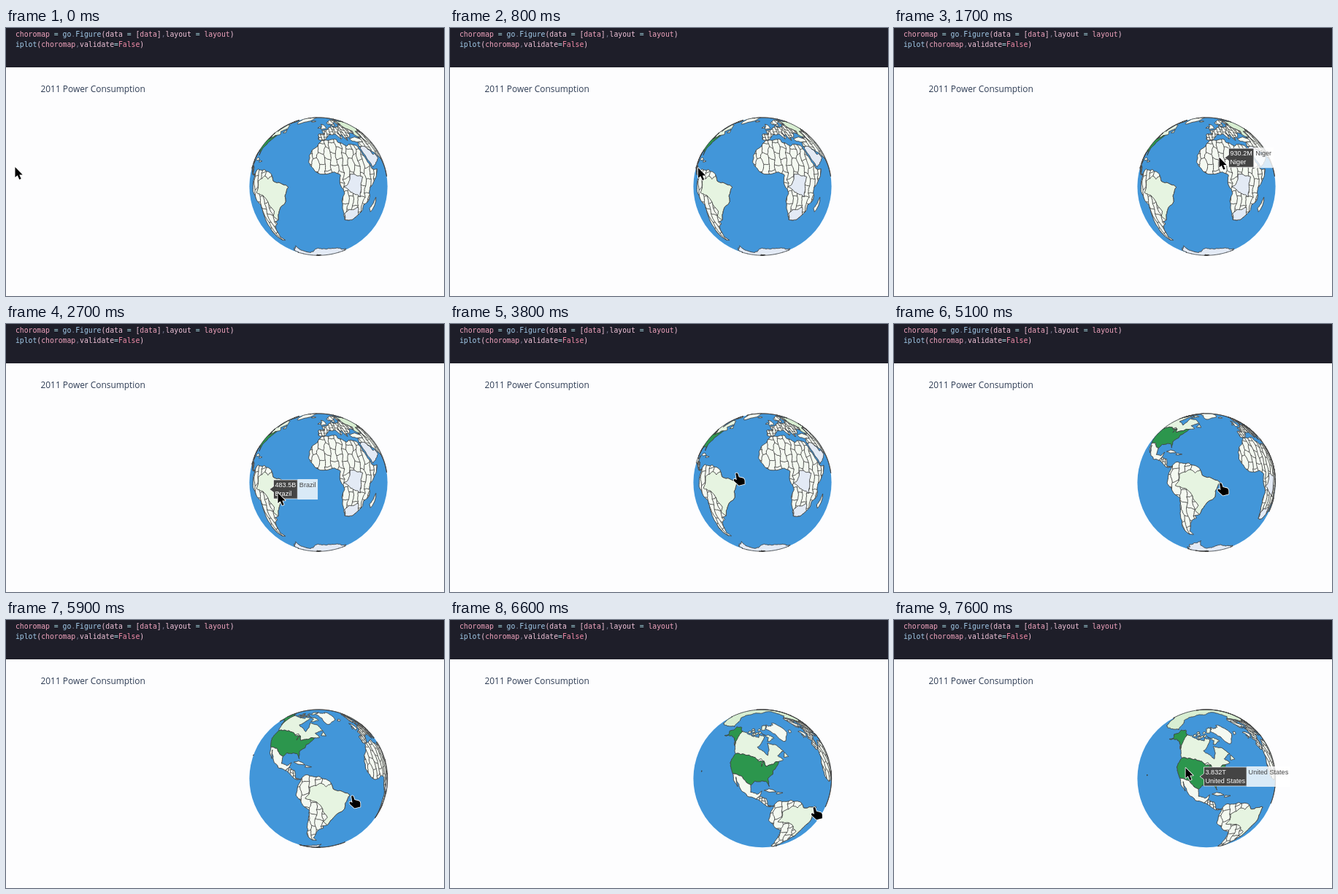
Recreate the animation shown at these times as an HTML page with a canvas. Size 600 by 368 pixels, loop 8000 ms.

```html
<!DOCTYPE html>
<html lang="en">
<head>
<meta charset="utf-8">
<title>Power consumption globe</title>
<style>
html, body { margin: 0; width: 100%; height: 100%; overflow: hidden; background: #fdfdfe; }
canvas, pre, h1 { position: absolute; left: 0; top: 0; margin: 0; font-weight: 400; }
pre { box-sizing: border-box; width: 600px; height: 54px; padding: 2.3px 0 0 13px; background: #1e1e29;
  color: #f0a3bd; font: 9.75px/13.2px "DejaVu Sans Mono", monospace; }
h1 { left: 47.5px; top: 74.6px; color: #2f3d55; font: 11.9px/16px "Open Sans", sans-serif; white-space: nowrap; }
i { font-style: normal; color: #a6d8e0; }
b { font-weight: 400; color: #a3cbea; }
u { text-decoration: none; color: #6c6f85; }
em { font-style: normal; color: #efc3d8; }
s { text-decoration: none; color: #f38ba8; }
</style>
</head>
<body>
<pre>choromap <i>=</i> <b>go</b><u>.</u><b>Figure</b><em>(data <i>=</i> [</em>data<em>]</em><u>,</u><em>layout</em> <i>=</i> layout<em>)</em>
<b>iplot</b><em>(</em>choromap<u>,</u><em>validate</em><i>=</i><s>False</s><em>)</em></pre>
<h1>2011 Power Consumption</h1>
<canvas width="600" height="368"></canvas>
<script>
const ctx = document.querySelector('canvas').getContext('2d');
const CX = 428, CY = 217.6, R = 94.6, RAD = Math.PI / 180;
const PALE = '#f4f9f1', LIGHT = '#e6f4e1', GREEN = '#2c964d', NONE = '#e3eaf5', MILD = '#d8eed2';
const lands = [];

// Seeded value from 0 to 1 that depends on a place
const noise = (x, y) => {
  const v = Math.sin(x * 12.9898 + y * 78.233) * 43758.5453;
  return v - Math.floor(v);
};

// Splits a line at displaced midpoints; the same both ways, so neighbours share a border
function rough(a, b) {
  const len = Math.hypot(a[0] - b[0], a[1] - b[1]);
  if (len < 2) return [a];
  const x = (a[0] + b[0]) / 2, y = (a[1] + b[1]) / 2, k = Math.min(len, 12) * 0.22;
  const mid = [x + k * (noise(x, y) - 0.5), y + k * (noise(y, x) - 0.5)];
  return [...rough(a, mid), ...rough(mid, b)];
}

// Honeycomb of uneven country borders over the box of a coast
function borders(coast, step) {
  const xs = coast.map(p => p[0] / step), ys = coast.map(p => p[1] / step), lines = [];
  const node = (i, j) => [(i + 0.6 * noise(i, j + step)) * step, (j + 0.6 * noise(j + step, i)) * step];
  const line = (a, b) => lines.push([...rough(a, b), b]);
  for (let i = Math.floor(Math.min(...xs)) - 1; i <= Math.max(...xs); i++)
    for (let j = Math.floor(Math.min(...ys)) - 1; j <= Math.max(...ys); j++) {
      line(node(i, j), node(i, j + 1));
      if ((i + j) % 2 === 0) line(node(i, j), node(i + 1, j));
    }
  return lines;
}

// Corners as longitude, latitude; step is the size of the countries inside, 0 for none
function land(fill, step, ...p) {
  const corners = [];
  for (let i = 0; i < p.length; i += 2) corners.push([p[i], p[i + 1]]);
  const coast = corners.flatMap((c, i) => rough(c, corners[(i + 1) % corners.length]));
  lands.push({ fill, coast, lines: step ? borders(coast, step) : [] });
}

// Antarctica, closed through the pole
land(NONE, 0, -180, -78, -100, -73, -66, -67, -57, -63.5, -62, -72, -50, -78, -28, -77, -17, -71.5, 30, -69,
  120, -66, 180, -78, 180, -90, -180, -90);

// Asia and Europe
land(MILD, 0, 28, 57, 31, 53, 40, 49.5, 37, 45, 47.5, 42.5, 47, 50, 70, 55, 87, 49.5, 120, 52, 131, 43, 140, 53,
  160, 52, 190, 66, 140, 72.5, 100, 77, 70, 69, 44, 68, 41, 66.8, 31, 70, 30, 60);
land(PALE, 7, 36, 36, 34.5, 31, 48, 29.5, 57, 27, 70, 22, 77.5, 8, 85, 20, 98, 27, 98, 50, 87, 49.5, 70, 55, 47, 50,
  53, 37, 47.5, 42.5, 41, 42, 44, 37);
land(NONE, 0, 35, 29.3, 39, 32, 48, 29, 51, 25, 56, 26, 59.8, 22.5, 45, 12.8, 39, 21);
land(PALE, 0, 26.5, 39.5, 35, 42, 44, 40, 44, 37, 36, 36, 28, 36.7);
land(PALE, 3.5, -9, 37, -9, 43.2, -1.5, 43.5, -4.7, 48.4, 8.5, 54, 10.5, 57.5, 11, 54, 20, 54.6, 23.5, 59.2, 28, 59.5,
  31, 53, 40, 49.5, 37, 46, 31, 46.5, 28, 41.2, 23, 40.5, 22.7, 36.7, 19.3, 42, 13.5, 45.5, 18, 40, 15.7, 38,
  10.3, 44, 3, 43, -2, 36.8);
land(PALE, 8, 31, 70, 25.8, 71, 14, 67.5, 5, 61.5, 7, 58, 10.7, 59.2, 12.8, 55.6, 17, 57, 17.2, 61.5, 24, 65.5,
  22, 61, 28, 60.3, 30, 66);
land(PALE, 0, -5.5, 50, 1.5, 52, -2, 57.5, -5, 58.6);
land(PALE, 0, -10, 52, -6, 52.5, -7, 55);
land(PALE, 0, -23, 64.5, -18, 63.4, -14, 65, -18, 66.4);

// Africa
land(PALE, 5.4, -6, 35.8, 10, 37.3, 11, 34, 19, 30.5, 22, 32.7, 32.5, 31, 37, 21, 43, 11.5, 51, 12, 47, 4, 39.5, -4.5,
  40.6, -15, 35, -20, 35.5, -24, 32.5, -28.5, 27, -33.7, 18.5, -34.2, 15, -27, 11.8, -17.5, 13.7, -11, 9, -1,
  9.6, 4, 4.5, 6.3, -7.5, 4.4, -13, 8.5, -17.4, 14.7, -17, 21, -10, 29.5);
land(NONE, 0, 12.5, -5.9, 17, -8, 22, -11, 29.5, -13.4, 29, -2, 31, 3.5, 18.5, 5, 16, -4);
land(NONE, 0, 18.5, -34.2, 16.5, -28.6, 20, -25, 29.5, -22.2, 32.5, -28.5, 27, -33.7);
land(PALE, 0, 49.3, -12.2, 50.4, -15.5, 47.2, -25, 44, -22);

// South America
land(PALE, 6, -77, 8, -72, 12, -62, 10.7, -51.5, 4.3, -50, 0, -35, -6, -39, -13.5, -39, -18, -48.5, -26, -53.5, -33.7,
  -58, -34.3, -57, -37, -62, -39, -65, -43, -69, -50.5, -65.3, -54.8, -71, -54.5, -75.5, -48, -73.5, -39,
  -70.3, -18.4, -76, -14, -81.2, -6, -80, 1);
land(LIGHT, 0, -51.5, 4.3, -50, 0, -35, -6, -39, -13.5, -39, -18, -48.5, -26, -53.5, -33.7, -57.5, -30, -54, -25.5,
  -58, -20, -60.5, -14, -65.3, -10.5, -73.5, -8, -70, -4, -69.5, 1.5, -64, 3, -60, 5, -56, 2);

// North America
land(LIGHT, 0, -123, 49, -130, 55, -141, 60.3, -141, 69.6, -124, 69.5, -95, 68.2, -94, 71.5, -82, 69, -87, 64.5,
  -94.7, 59, -85, 55.3, -79.5, 51.3, -76.5, 56.5, -77.5, 62.5, -64.5, 60, -56, 52.5, -66.5, 50, -61, 45.5,
  -67, 45, -71, 45.2, -79, 43, -82.5, 42, -84.5, 46.5, -95, 49);
land(GREEN, 0, -123, 49, -95, 49, -84.5, 46.5, -82.5, 42, -79, 43, -71, 45.2, -67, 45, -70, 41.6, -75.5, 38, -76, 35,
  -81, 32, -80.3, 25.2, -83, 29.5, -90, 29.3, -94, 29.6, -97.3, 26, -103, 29, -106.5, 31.8, -117.2, 32.5,
  -124.3, 40.3);
land(PALE, 0, -92, 46.7, -88, 48.6, -85, 46.5);
land(PALE, 0, -87.5, 42, -87.5, 45, -85.5, 46);
land(GREEN, 0, -141, 69.6, -156, 71.2, -166, 68, -161, 64.5, -165, 61, -157, 58.8, -162, 55.5, -150, 60.5, -141, 60.3,
  -131, 55);
land(GREEN, 0, -156, 20, -155, 19.6, -155.7, 19);
land(PALE, 0, -117.2, 32.5, -106.5, 31.8, -103, 29, -97.3, 26, -97, 20, -91.5, 18.6, -87, 21.5, -89, 17, -92, 14.5,
  -105.5, 20.3, -113, 30.5, -109.5, 23, -115, 28);
land(PALE, 2.5, -89, 17, -83.2, 15, -82, 9, -77, 8, -83, 8.2, -92, 14.5);
land(PALE, 0, -85, 22, -81, 23.2, -74.2, 20.2);
land(PALE, 0, -74.3, 18.4, -73, 19.9, -68.4, 18.6);
land(LIGHT, 0, -59, 47.7, -53, 47, -55.7, 51.5);
land(LIGHT, 0, -62, 66.5, -77, 64.5, -73, 68, -88, 73, -72, 71);
land(LIGHT, 0, -90, 77, -78, 76.5, -62, 82.5, -90, 81.5);
for (let i = 0; i < 8; i++) {
  const x = -122 + 4 * i, y = 70.5 + 6 * noise(i, 4);
  land(LIGHT, 0, x - 5, y, x, y - 1.3, x + 5, y + 0.5, x, y + 1.5);
}
land(PALE, 0, -73, 78.3, -54, 70, -48, 61, -42, 61, -22, 70.5, -18, 80, -60, 82);

// Rows of time, x, y
const turn = [[3500, -9, -6], [4300, -22.5, -6], [5100, -46.5, -6], [5900, -62.3, 9], [6700, -90, 35.3]];
const mouse = [[0, 12.5, 191], [100, 12.5, 191], [600, 300, 200], [1300, 440, 172], [1700, 445.5, 177.5],
  [2200, 438, 190], [2700, 372.5, 232], [3200, 386, 206], [3500, 386, 206], [4300, 408, 204], [5100, 449, 219],
  [5900, 476, 242], [6700, 504, 260], [6900, 504, 260], [7200, 396, 198], [7600, 399.5, 203]];
const tips = [
  { from: 1400, to: 2200, x: 453, y: 178.2, value: '930.2M', name: 'Niger' },
  { from: 2600, to: 3100, x: 361, y: 227, value: '483.5B', name: 'Brazil' },
  { from: 7400, to: 8000, x: 419, y: 215, value: '3.832T', name: 'United States' }
];
const arrow = new Path2D('M0 0V14L3.2 11.2 5.8 17 8.2 16 5.8 10.4H10.2Z');
const hand = new Path2D('M-3 0Q-1.2-1.6 0 .5L1.5 5 7.5 6.4Q9.4 7.4 9.4 10V14.5L1.5 16.5-5 10.5Q-6.5 7.6-4 7.4L-1.5 9Z');

function along(keys, t) {
  const i = keys.findIndex(k => k[0] > t);
  if (i < 0) return keys.at(-1).slice(1);
  if (!i) return keys[0].slice(1);
  const a = keys[i - 1], b = keys[i], f = (t - a[0]) / (b[0] - a[0]);
  return [a[1] + (b[1] - a[1]) * f, a[2] + (b[2] - a[2]) * f];
}

function project([lon, lat], [lon0, lat0]) {
  const d = (lon - lon0) * RAD, a = lat * RAD, b = lat0 * RAD;
  const x = Math.cos(a) * Math.sin(d);
  const y = Math.sin(a) * Math.cos(b) - Math.cos(a) * Math.sin(b) * Math.cos(d);
  const seen = Math.sin(a) * Math.sin(b) + Math.cos(a) * Math.cos(b) * Math.cos(d) > 0;
  // Hidden points are pushed out to the rim
  const k = seen ? R : R / Math.hypot(x, y);
  return { x: CX + x * k, y: CY - y * k, seen };
}

function drawLand({ fill, coast, lines }, view) {
  const pts = coast.map(p => project(p, view));
  if (!pts.some(q => q.seen)) return;
  const shape = new Path2D();
  pts.forEach(q => shape.lineTo(q.x, q.y));
  shape.closePath();
  ctx.fillStyle = fill;
  ctx.fill(shape);
  ctx.save();
  ctx.clip(shape);
  ctx.beginPath();
  for (const line of lines)
    line.map(p => project(p, view)).filter(q => q.seen)
      .forEach((q, i) => i ? ctx.lineTo(q.x, q.y) : ctx.moveTo(q.x, q.y));
  ctx.stroke();
  ctx.restore();
  ctx.stroke(shape);
}

function drawTip({ x, y, value, name }) {
  ctx.font = '9.1px "Liberation Sans", Arial, sans-serif';
  const nameWidth = ctx.measureText(name).width;
  const left = x + 5.5, w = Math.max(ctx.measureText(value).width, nameWidth) + 4;
  ctx.fillStyle = 'rgba(255,255,255,.8)';
  ctx.fillRect(left + w, y - 14, nameWidth + 5, 28);
  ctx.fillStyle = '#444';
  ctx.strokeStyle = '#fff';
  ctx.lineWidth = 0.7;
  const box = new Path2D(`M${x} ${y}l5.5 -4v-9h${w}v26h${-w}v-9Z`);
  ctx.fill(box);
  ctx.stroke(box);
  ctx.fillText(name, left + w + 2.5, y - 3);
  ctx.fillStyle = '#fff';
  ctx.fillText(value, left + 2, y - 3);
  ctx.fillText(name, left + 2, y + 9);
}

function draw(now) {
  let t = Math.floor(now % 8000 / 100) * 100;
  // The drag refreshes at half the rate
  if (t >= 4900 && t < 6300) t -= (t - 100) % 200;
  const view = along(turn, t);
  ctx.clearRect(0, 0, 600, 368);
  ctx.fillStyle = '#4296d9';
  ctx.beginPath();
  ctx.arc(CX, CY, R, 0, 7);
  ctx.fill();
  ctx.strokeStyle = '#404040';
  ctx.lineWidth = 0.9;
  ctx.lineJoin = 'round';
  lands.forEach(l => drawLand(l, view));
  tips.filter(s => t >= s.from && t < s.to).forEach(drawTip);

  const pointer = t >= 3600 && t < 7000 ? hand : arrow;
  ctx.save();
  ctx.translate(...along(mouse, t));
  ctx.strokeStyle = '#fff';
  ctx.lineWidth = 1.6;
  ctx.stroke(pointer);
  ctx.fillStyle = '#000';
  ctx.fill(pointer);
  ctx.restore();
}

const start = performance.now();
function loop() {
  draw(performance.now() - start);
  requestAnimationFrame(loop);
}
loop();
</script>
</body>
</html>
```
